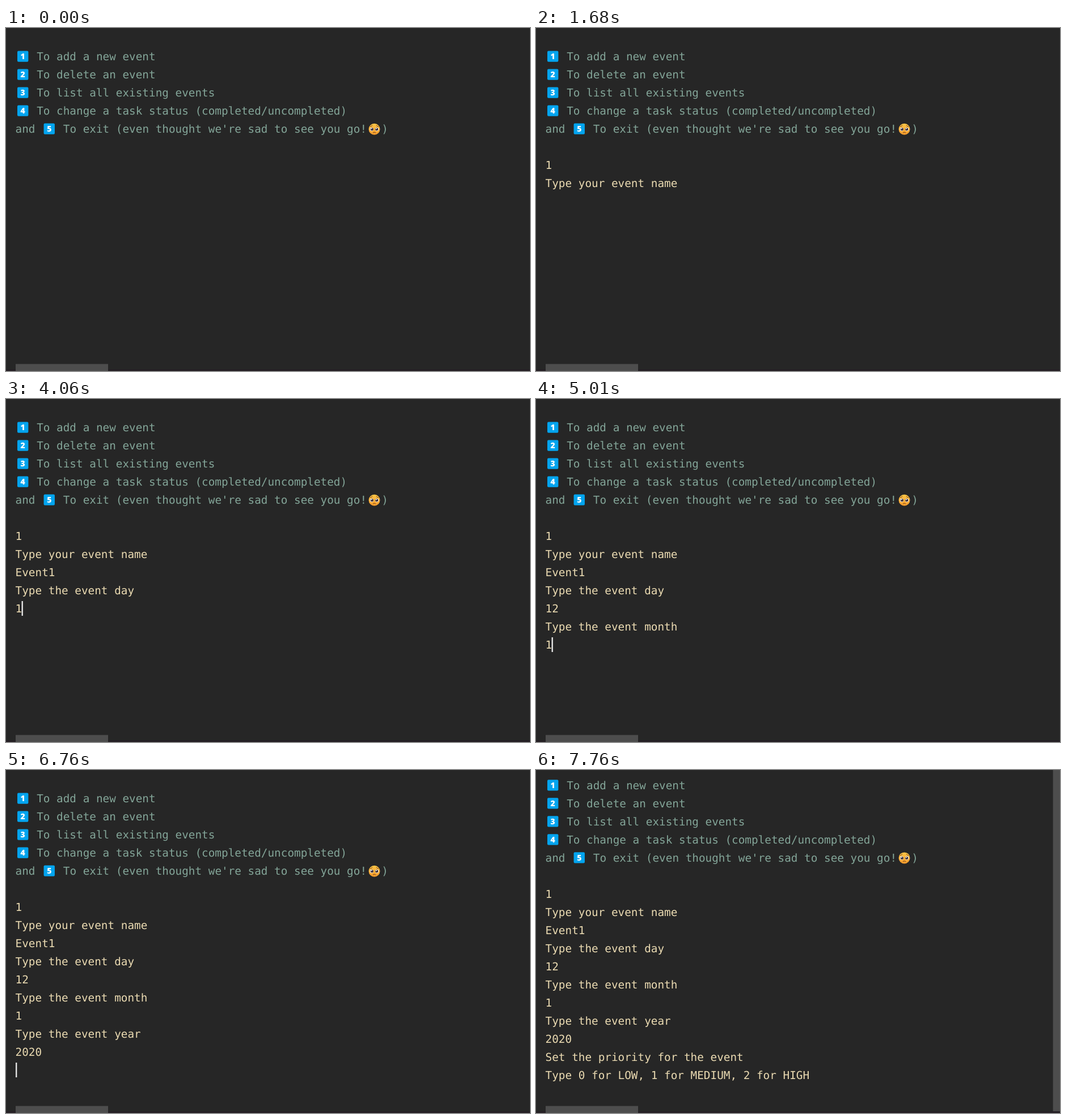
An HTML page that plays this animation: 924x606 px, repeating every 8 s.

```html
<!DOCTYPE html>
<html lang="en">
<head>
<meta charset="utf-8">
<title>Event terminal</title>
<style>
  html, body { margin: 0; height: 100%; overflow: hidden; background: #262626; }
  svg { display: block; width: 100vw; height: 100vh; }
  text {
    font: 19.33px "DejaVu Sans Mono", monospace;
    text-rendering: geometricPrecision;
    white-space: pre;
    fill: #ebdbb2;
  }
  .menu { fill: #83a598; }
  .digit { font: 800 14px "Open Sans", sans-serif; fill: #fff; text-anchor: middle; }
</style>
</head>
<body>
<svg viewBox="0 0 924 606">
  <defs>
    <linearGradient id="skin" x2="0" y2="1">
      <stop offset="0" stop-color="#fbc546"/>
      <stop offset="1" stop-color="#f59a2c"/>
    </linearGradient>
  </defs>
  <g id="page">
    <g transform="translate(649.5 178.8)">
      <circle r="10" fill="url(#skin)"/>
      <g fill="#fff"><circle cx="-4.6" r="3.1"/><circle cx="4.6" r="3.1"/></g>
      <g fill="#35242c"><circle cx="-4.2" r="2.5"/><circle cx="4.2" r="2.5"/></g>
      <g fill="#fff"><circle cx="-4.9" cy="-1" r="1"/><circle cx="3.5" cy="-1" r="1"/></g>
      <path d="M-7.2-4.6Q-5-5-3.6-6.6M7.2-4.6Q5-5 3.6-6.6M-2.2 6.2Q0 4.2 2.2 6.2"
            fill="none" stroke="#6b3a1c" stroke-linecap="round"/>
    </g>
    <rect id="caret" width="2.4" height="26" fill="#e2e2e2"/>
  </g>
  <rect y="603" width="924" height="3" fill="#251f24"/>
  <rect x="17" y="593.6" width="163" height="12.4" fill="#4d4d4d"/>
  <rect id="bar" x="911.6" width="12.4" height="603" fill="#4d4d4d"/>
</svg>
<script>
const LOOP = 8000, LEFT = 16.6, CELL = 11.64, ROW = 32, KEYCAP = 37.6;
const SCROLL_AT = 7010, SCROLL_BY = 23.4;
const get = id => document.getElementById(id);
const page = get('page'), caret = get('caret'), bar = get('bar');

function add(tag, attrs, content = '') {
  const el = document.createElementNS('http://www.w3.org/2000/svg', tag);
  for (const name in attrs) el.setAttribute(name, attrs[name]);
  el.textContent = content;
  page.insertBefore(el, caret);
  return el;
}

const write = (x, row, content, cls = '') =>
  add('text', { x, y: 57.1 + row * ROW, class: cls }, content);

function menuItem(row, label, prefix = '') {
  const x = LEFT + prefix.length * CELL;
  const y = 40.6 + row * ROW;
  write(LEFT, row, prefix, 'menu');
  add('rect', { x: x + 3.4, y, width: 19.4, height: 19.2, rx: 2, fill: '#03a4ee' });
  add('text', { x: x + 13.1, y: y + 14.7, class: 'digit' }, row + 1);
  write(x + KEYCAP, row, label, 'menu');
}

menuItem(0, 'To add a new event');
menuItem(1, 'To delete an event');
menuItem(2, 'To list all existing events');
menuItem(3, 'To change a task status (completed/uncompleted)');
menuItem(4, "To exit (even thought we're sad to see you go!", 'and ');
write(662.3, 4, ')', 'menu');

// Printed prompts: time, row, text
const prompts = [
  [1110, 7, 'Type your event name'],
  [3250, 9, 'Type the event day'],
  [4760, 11, 'Type the event month'],
  [5380, 13, 'Type the event year'],
  [7010, 15, 'Set the priority for the event'],
  [7010, 16, 'Type 0 for LOW, 1 for MEDIUM, 2 for HIGH']
].map(([time, row, label]) => ({ time, el: write(LEFT, row, label) }));

// Input: time, row, typed so far, caret visible
const input = [
  [0, 6, '', 0], [160, 6, '', 1], [660, 6, '', 0], [850, 6, '1', 1], [920, 6, '1', 0],
  [1110, 8, '', 1], [1680, 8, '', 0], [2180, 8, '', 1], [2510, 8, 'E', 1],
  [2760, 8, 'Ev', 1], [2820, 8, 'Eve', 1], [2880, 8, 'Even', 1],
  [2970, 8, 'Event', 1], [3060, 8, 'Event1', 1],
  [3250, 10, '', 1], [4060, 10, '1', 1], [4630, 10, '12', 1],
  [4760, 12, '', 1], [5010, 12, '1', 1],
  [5380, 14, '', 1], [5630, 14, '2', 1], [5760, 14, '20', 1],
  [5940, 14, '202', 1], [6010, 14, '2020', 1],
  [6760, 15, '', 1], [7010, 17, '', 1], [7760, 17, '', 0]
];
const inputRows = [6, 8, 10, 12, 14].map(row => ({ row, el: write(LEFT, row, '') }));

const show = (el, on) => el.setAttribute('visibility', on ? 'visible' : 'hidden');

function draw(now) {
  const t = now % LOOP;
  const past = input.filter(step => step[0] <= t);
  const [, row, typed, caretOn] = past[past.length - 1];

  for (const p of prompts) show(p.el, t >= p.time);
  for (const line of inputRows) {
    const last = past.filter(step => step[1] === line.row).pop();
    line.el.textContent = last ? last[2] : '';
  }

  caret.setAttribute('x', Math.max(17, 15.9 + typed.length * CELL));
  caret.setAttribute('y', 37 + row * ROW);
  show(caret, caretOn);

  const scrolled = t >= SCROLL_AT;
  page.setAttribute('transform', `translate(0 ${scrolled ? -SCROLL_BY : 0})`);
  show(bar, scrolled);
  requestAnimationFrame(draw);
}
draw(performance.now());
</script>
</body>
</html>
```
